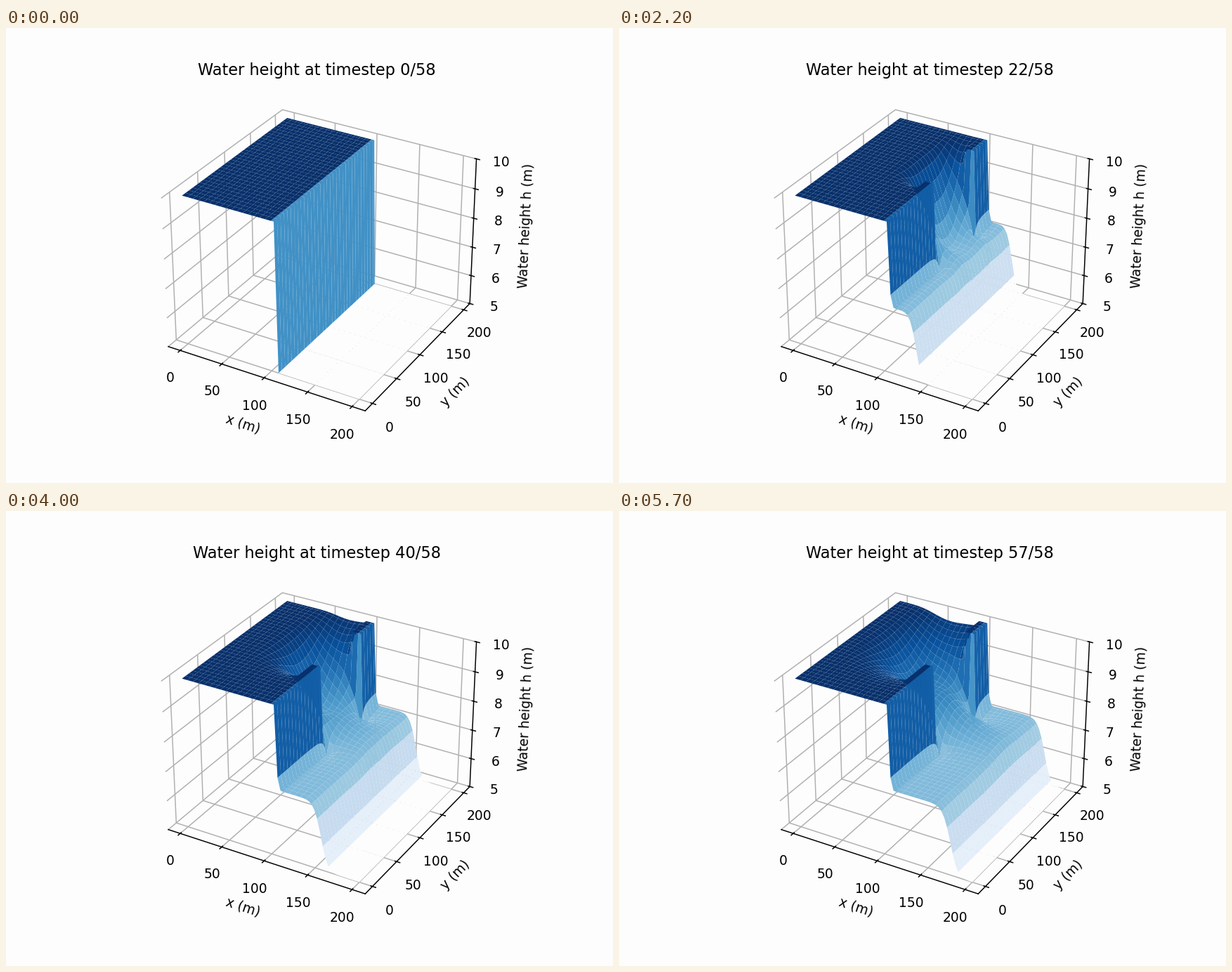
Recreate the animation shown at these times as a matplotlib script. Size 864 by 648 pixels, loop 5.8 s.

```python
import numpy as np
import matplotlib.pyplot as plt
from matplotlib.animation import FuncAnimation
from matplotlib.colors import ListedColormap, Normalize
from mpl_toolkits.mplot3d.art3d import Poly3DCollection

SIZE, CELLS, STEPS = 200, 64, 58
DX = SIZE / CELLS
G = 9.81
HIGH, LOW = 10, 5
PAPER = "#fdfdfd"

axis = np.linspace(0, SIZE, CELLS)
X, Y = np.meshgrid(axis, axis)
wall = (X >= 95) & (X <= 105) & ((Y < 95) | (Y > 170))


def outflow(h, p, q):
    """HLL flux balance along the last axis; p is normal, q transverse momentum."""
    h, p, q = (np.pad(a, ((0, 0), (1, 1)), mode="edge") for a in (h, p, q))
    u, c = p / h, np.sqrt(G * h)
    left, right = np.s_[:, :-1], np.s_[:, 1:]
    sl = np.minimum(np.minimum((u - c)[left], (u - c)[right]), 0)
    sr = np.maximum(np.maximum((u + c)[left], (u + c)[right]), 0)

    def balance(a, f):
        flux = (sr * f[left] - sl * f[right]
                + sl * sr * (a[right] - a[left])) / (sr - sl)
        return np.diff(flux, axis=1) / DX

    return balance(h, p), balance(p, p * u + G * h**2 / 2), balance(q, q * u)


def simulate():
    h = np.where(X <= 105, float(HIGH), float(LOW))
    p, q = np.zeros_like(h), np.zeros_like(h)
    heights = []
    for n in range(STEPS):
        heights.append(h)
        # the step shrinks as the jet through the breach speeds up
        dt = 0.113 + 0.035 / (1 + np.exp((n - 20) / 5))
        hx, px, qx = outflow(h, p, q)
        hy, qy, py = (a.T for a in outflow(h.T, q.T, p.T))
        h, p, q = h - dt * (hx + hy), p - dt * (px + py), q - dt * (qx + qy)
        h[wall], p[wall], q[wall] = HIGH, 0, 0
    return heights


heights = simulate()

# each facet is the outline of a 2 x 2 block of cells
starts = np.arange(0, CELLS - 1, 2)
row, col = (a.reshape(-1, 1) for a in np.meshgrid(starts, starts, indexing="ij"))
row = np.minimum(row + [0, 0, 0, 1, 2, 2, 2, 1], CELLS - 1)
col = np.minimum(col + [0, 1, 2, 2, 2, 1, 0, 0], CELLS - 1)


def facets(h):
    return np.stack([axis[col], axis[row], h[row, col]], axis=-1)


shades = plt.get_cmap("Blues")(np.arange(256))
shades[:23, :3] = 253 / 255

fig = plt.figure(figsize=(6.4, 4.8), dpi=135, facecolor=PAPER)
ax = fig.add_subplot(projection="3d", facecolor=PAPER)
for side in (ax.xaxis, ax.yaxis, ax.zaxis):
    side.set_pane_color(PAPER)
ax.auto_scale_xyz([0, SIZE], [0, SIZE], [LOW, HIGH])
ax.set_zlim(LOW, HIGH)
ax.set_xlabel("x (m)")
ax.set_ylabel("y (m)")
ax.set_zlabel("Water height h (m)")

water = Poly3DCollection(facets(heights[0]), cmap=ListedColormap(shades),
                         norm=Normalize(LOW, HIGH))
ax.add_collection3d(water)


def update(n):
    verts = facets(heights[n])
    water.set_verts(verts)
    water.set_array(verts[..., 2].mean(axis=1))
    ax.set_title(f"Water height at timestep {n}/{STEPS}")
    return (water,)


anim = FuncAnimation(fig, update, frames=STEPS, interval=100, repeat=True,
                     repeat_delay=0, init_func=lambda: update(0))
plt.show()
```
